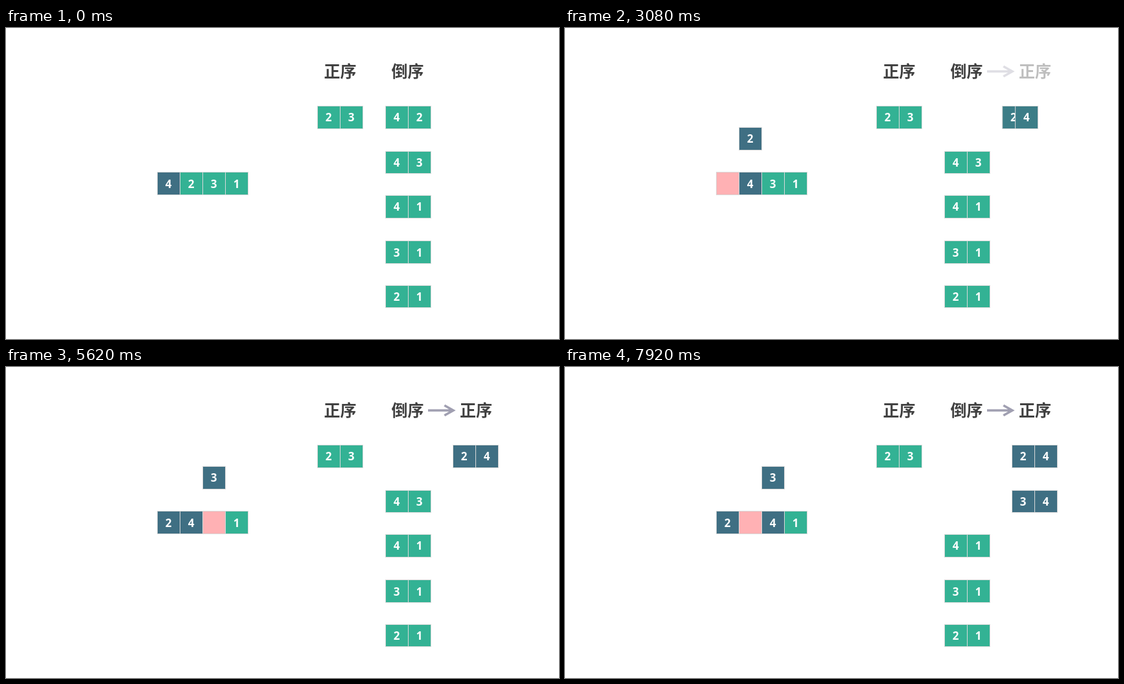
An HTML page for the animation above (8 s loop, 853 by 480 pixels).

```html
<!DOCTYPE html>
<html lang="zh-CN">
<head>
<meta charset="utf-8">
<title>逆序对</title>
<style>
html, body { margin: 0; width: 100%; height: 100%; overflow: hidden; background: #fff; }
svg { display: block; width: 100%; height: 100%; }
rect { stroke: #d9d9d9; stroke-width: 1; }
.digit { font: 700 17px "Open Sans", "Noto Sans", sans-serif; fill: #fff; text-anchor: middle; }
.head { font: 700 25px "Noto Sans CJK SC", "Noto Sans CJK", sans-serif; fill: #404040; }
.arrow { fill: none; stroke: #a09fb1; stroke-width: 3.6; }
</style>
</head>
<body>
<svg id="stage" viewBox="0 0 853 480"></svg>
<script>
const LOOP = 8000, STEP = 60, STEPS = 8;
const STARTS = [600, 1750, 2900, 4050, 5200, 6350, 7500];
const GREEN = [51, 178, 148], DARK = [63, 111, 131];
const SIZE = 35, LEFT = 233.5, ROW = 222.5, LIFT = 69;

const stage = document.getElementById('stage');

function add(parent, name, attrs, text) {
  const el = document.createElementNS('http://www.w3.org/2000/svg', name);
  for (const key in attrs) el.setAttribute(key, attrs[key]);
  if (text) el.textContent = text;
  parent.appendChild(el);
  return el;
}

function heading(parent, x, text) {
  add(parent, 'text', { x, y: 76.3, class: 'head' }, text);
}

function makeTile(digit, height = SIZE, shift = 0) {
  const g = add(stage, 'g', {});
  const box = add(g, 'rect', { width: SIZE, height });
  const label = add(g, 'text', { x: 17.2, y: 23.6 + shift, class: 'digit' }, digit);
  return { g, box, label };
}

function place(tile, x, y, dark) {
  const rgb = GREEN.map((c, i) => Math.round(c + (DARK[i] - c) * dark));
  tile.g.setAttribute('transform', `translate(${x} ${y})`);
  tile.box.setAttribute('fill', `rgb(${rgb})`);
}

// A pair is listed as [left, right]; the left tile lies on top.
function makePair(x, y, [a, b], height, shift) {
  const right = makeTile(b, height, shift);
  const left = makeTile(a, height, shift);
  return swap => {
    place(left, x + 139 * swap, y, swap);
    place(right, x + SIZE + 69 * swap, y, swap);
  };
}

// Cubic bezier (.25, .1) (.288, 1), solved by bisection.
function ease(p) {
  if (p <= 0 || p >= 1) return p <= 0 ? 0 : 1;
  const curve = (u, a, b) => 3 * (1 - u) ** 2 * u * a + 3 * (1 - u) * u * u * b + u ** 3;
  let lo = 0, hi = 1;
  for (let i = 0; i < 24; i++) {
    const mid = (lo + hi) / 2;
    if (curve(mid, 0.25, 0.288) < p) lo = mid; else hi = mid;
  }
  return curve(lo, 0.1, 1);
}

heading(stage, 490.5, '正序');
heading(stage, 594.5, '倒序');
const result = add(stage, 'g', {});
heading(result, 700, '正序');
add(result, 'path', { class: 'arrow', d: 'M651 67H689M676.3 59.3L690 67L676.3 74.7' });

makePair(480.5, 120.5, '23')(0);
const pair42 = makePair(585.5, 120.5, '42');
const pair43 = makePair(585.5, 190.5, '43', 34);
makePair(585.5, 258.5, '41')(0);
makePair(585.5, 328.5, '31', SIZE, 1)(0);
makePair(585.5, 397.5, '21', 34)(0);

const gap = add(stage, 'rect', { y: ROW, width: SIZE, height: SIZE, fill: '#ffb1b4' });
const [four, two, three, one] = [...'4231'].map(d => makeTile(d, SIZE, 1));
place(one, LEFT + 3 * SIZE, ROW, 0);

function liftTile(tile, x, lift, dark) {
  place(tile, x, ROW - LIFT * lift, dark);
  tile.label.setAttribute('y', 24.6 - lift);
}

function draw(t) {
  const p = STARTS.map(s => Math.max(0, Math.min(1, (Math.floor((t - s) / STEP) + 1) / STEPS)));
  const m = p.map(ease);
  const fade = p.map(v => Math.max(0, (v - 0.25) / 0.75));

  liftTile(two, LEFT + SIZE * (1 - m[3]), m[0] - m[3], m[0]);
  liftTile(three, LEFT + 2 * SIZE, m[4], m[4]);
  place(four, LEFT + SIZE * (m[1] + m[5]), ROW, 1);

  const cell = p[4] > 0 ? 2 - m[5] : 1 - m[1];
  gap.setAttribute('x', LEFT + SIZE * cell);
  gap.setAttribute('opacity', fade[0] - fade[3] + fade[4]);

  pair42(m[2]);
  pair43(m[6]);
  result.setAttribute('opacity', fade[2]);
}

const begin = performance.now();
function tick() {
  draw((performance.now() - begin) % LOOP);
  requestAnimationFrame(tick);
}
tick();
</script>
</body>
</html>
```
